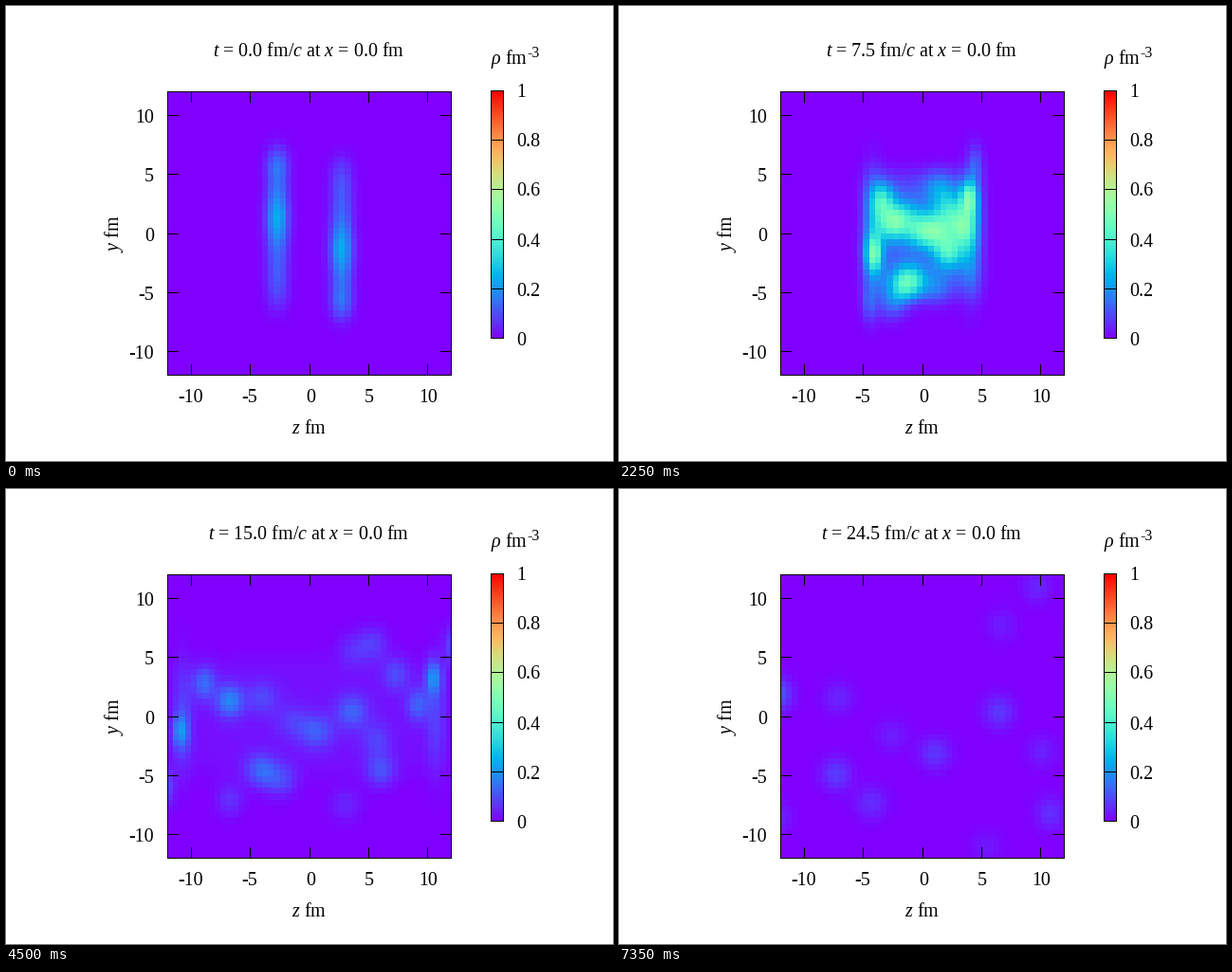
Recreate the animation shown at these times as a matplotlib script. Size 640 px wide and 480 px high, loop 7.5 s.

```python
import numpy as np
import matplotlib.pyplot as plt
from matplotlib.animation import FuncAnimation
from matplotlib.patches import Rectangle

FRAMES, STEP_MS, DT = 50, 150, 0.5
W, H, DPI = 640, 480, 80
LEFT, TOP, SIDE, HALF = 170, 90, 300, 12
CELLS = 48
PX = 72 / DPI                      # points per pixel
T_HIT = 3                          # full overlap of the nuclei, fm/c

plt.rcParams.update({
    "font.family": "Liberation Serif",
    "mathtext.fontset": "custom",
    "mathtext.rm": "Liberation Serif",
    "mathtext.it": "Liberation Serif:italic",
})

# Fragments fly straight: z velocity, launch height, y velocity, strength
FRAGMENTS = [
    (.87, 2.8, .04, .20), (.76, 0, .08, .14), (.61, 0, .30, .10),
    (.45, .2, .50, .09), (.31, 3, .22, .07), (.30, .4, 0, .14),
    (.05, 1, -.19, .13), (.47, -.6, -.11, .08), (.50, 0, -.38, .12),
    (.25, -3, -.37, .06), (-.12, 1, -.12, .07), (-.33, 1.6, 0, .09),
    (-.56, .6, .06, .20), (-.74, 2.8, 0, .16), (-.91, -2, .06, .18),
    (-.34, -4.2, -.03, .15), (-.20, -3, -.20, .11), (-.56, -5.2, -.15, .08),
]

centres = (np.arange(CELLS) + .5) * 2 * HALF / CELLS - HALF
Z, Y = np.meshgrid(centres, centres)


def blob(z, y, height, sz, sy):
    return height * np.exp(-((Z - z) / sz) ** 2 / 2 - ((Y - y) / sy) ** 2 / 2)


def box(z, height, w, h):
    return height * np.exp(-((Z - z) / w) ** 6 - (Y / h) ** 6)


def nuclei(t):
    """Two columns crossing; only their outer tips fly on undamped."""
    z = (t - T_HIT) * (.9 if t < T_HIT else 1)
    fade = np.interp(t, [3, 9], [1, 0])
    sz = np.interp(t, [3, 7], [.68, .45])
    total = 0
    for side in (1, -1):
        column = blob(side * z, 0, .12 * fade, sz, 99) * np.exp(-(Y / 6.3) ** 6)
        lump = blob(side * z, side * 1.3, .12 * fade, sz, 1.5)
        tip = blob(side * z, side * 6, .09, sz, 1.1)
        total = total + column + lump + tip
    return total


def fireball(t):
    """Hot core inside a slab that stretches along the beam."""
    core = np.interp(t, [1.5, 3.5, 4.5, 6, 7.5], [0, .65, .55, .25, 0])
    slab = np.interp(t, [1.5, 3, 4.5, 7.5, 11.5, 18], [0, .35, .32, .11, .05, 0])
    width = 1 + .87 * max(t - T_HIT, 0)
    height = np.interp(t, [4.5, 7.5], [6, 5.2])
    return (blob(-.7, -.6, core, .8, 1.2) + blob(.4, .4, core * .9, .8, 1.2)
            + box(0, slab, width, height))


def debris(t):
    """Fragments and the two rims, thinning out as they expand."""
    age = max(t - T_HIT, .5)
    grow = np.clip((t - 2.5) / 5, 0, 1) ** 2
    thin = grow * (8.5 / age) ** .7
    total = sum(blob(vz * age, y + vy * age, a * thin,
                     .98 * np.sqrt(1 - min(abs(vz), .88) ** 2), .98)
                for vz, y, vy, a in FRAGMENTS)
    for side in (1, -1):
        total = total + blob(side * .89 * age, 0, .09 * thin, .6, 3.3)
    return total


def density(t):
    return nuclei(t) + fireball(t) + debris(t)


fig = plt.figure(figsize=(W / DPI, H / DPI), dpi=DPI, facecolor="white")
ax = fig.add_axes([0, 0, 1, 1])


def label(x, y, s, ha="center", va="baseline", size=20, **kw):
    return ax.text(x, y, s, ha=ha, va=va, fontsize=size * PX, **kw)


def line(xs, ys):
    ax.plot(xs, ys, color="black", lw=PX, solid_capstyle="butt",
            snap=False, zorder=3)


def frame(x, y, w, h):
    ax.add_patch(Rectangle((x, y), w, h, fill=False, ec="black", lw=PX,
                           snap=False, zorder=3))


def pixel(v):
    return np.floor(v + .5) + .5


style = dict(cmap="rainbow", vmin=0, vmax=1, interpolation="nearest",
             origin="lower", aspect="auto")
right, bottom = LEFT + SIDE, TOP + SIDE
image = ax.imshow(density(0), extent=(LEFT, right, bottom, TOP), **style)
ax.imshow(np.linspace(0, 1, 128)[:, None], extent=(511, 525, 351, 89), **style)
ax.set(xlim=(0, W), ylim=(H, 0))
ax.axis("off")

frame(LEFT + .5, TOP + .5, SIDE - 1, SIDE - 1)
frame(511.5, 89.5, 13, 261)

for v in range(-10, 11, 5):
    offset = v * (SIDE - 1) / (2 * HALF)
    mid = (SIDE - 1) / 2
    x, y = pixel(LEFT + mid + offset), pixel(TOP + mid - offset)
    for a, b in ((TOP, TOP + 12), (bottom - 12, bottom)):
        line([x, x], [a, b])
    for a, b in ((LEFT, LEFT + 12), (right - 12, right)):
        line([a, b], [y, y])
    label(x + (.5 if v >= 0 else -1), 418, str(v))
    label(156, y + 7.5, str(v), ha="right")

for k in range(6):
    y = pixel(350 - 52.2 * k)
    line([511, 525], [y, y])
    label(538.5, y + 7, f"{k / 5:g}", ha="left")

label(319, 451, r"$\mathit{z}$ fm")
label(125.5, 240, r"$\mathit{y}$ fm", ha="right", va="center", rotation=90)
label(511, 61, r"$\mathit{ρ}$ fm", ha="left")
label(549, 54, "-3", ha="left", size=16)
title = label(319, 53, "")


def update(i):
    t = i * DT
    image.set_data(density(t))
    title.set_text(rf"$\mathit{{t}}$ = {t:.1f} fm/$\mathit{{c}}$"
                   r" at $\mathit{x}$ = 0.0 fm")
    return image, title


anim = FuncAnimation(fig, update, frames=FRAMES, interval=STEP_MS,
                     repeat=True, repeat_delay=0)
plt.show()
```
